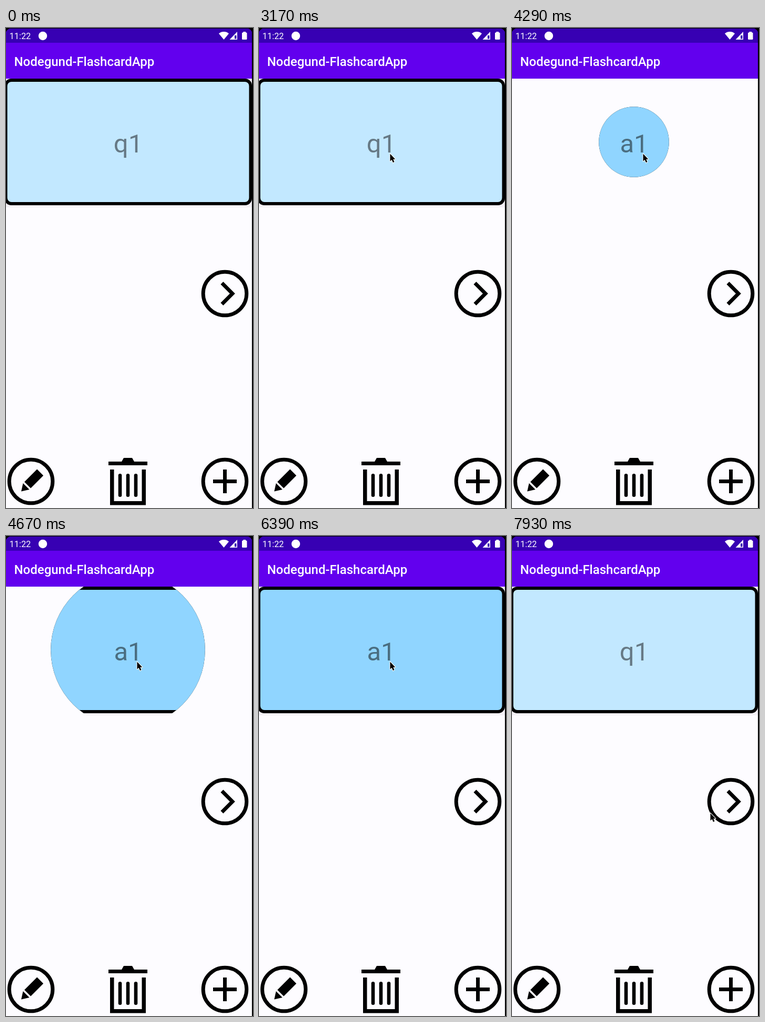
Write an HTML page with a canvas that moves like this. It is 470 px wide and 910 px high and loops after 8000 ms.

```html
<!DOCTYPE html>
<html lang="en">
<head>
<meta charset="utf-8">
<title>Flashcards</title>
<style>
  html, body { margin: 0; width: 100%; height: 100%; overflow: hidden; background: #fdfcff; }
  canvas { display: block; }
</style>
</head>
<body>
<canvas id="stage" width="470" height="910"></canvas>
<script>
const ctx = document.getElementById('stage').getContext('2d');
const LOOP = 8000;
const PAPER = '#fdfcff', SHADE = '#f4f1f6', PURPLE = '#6200ee', DARK = '#3700b3';
const FONT = 'Roboto, "Noto Sans", sans-serif';
const MIDDLE = { x: 232, y: 216 };
const FULL_RADIUS = 262;

// Ticks come in groups of three, lasting 20, 20 and 100 ms.
function tickAt(ms) {
  const k = ms - 3970;
  const group = Math.floor(k / 140);
  const rest = k - group * 140;
  return group * 3 + (rest < 20 ? 0 : rest < 40 ? 1 : 2);
}

const clamp = v => Math.max(0, Math.min(1, v));
const ease = v => 0.5 - Math.cos(Math.PI * clamp(v)) / 2;
const mix = (a, b, v) => a + (b - a) * v;

function rect(x, y, w, h, color = '#000') {
  ctx.fillStyle = color;
  ctx.fillRect(x, y, w, h);
}

function round(x, y, w, h, r, color) {
  ctx.beginPath();
  ctx.roundRect(x, y, w, h, r);
  ctx.fillStyle = color;
  ctx.fill();
}

function circle(x, y, r) {
  ctx.beginPath();
  ctx.arc(x, y, r, 0, Math.PI * 2);
}

function disc(x, y, r, color) {
  circle(x, y, r);
  ctx.fillStyle = color;
  ctx.fill();
}

function triangle(x1, y1, x2, y2, x3, y3, color = '#000') {
  ctx.beginPath();
  ctx.moveTo(x1, y1);
  ctx.lineTo(x2, y2);
  ctx.lineTo(x3, y3);
  ctx.closePath();
  ctx.fillStyle = color;
  ctx.fill();
}

function text(str, x, y, size, weight, color, align = 'left') {
  ctx.font = `${weight} ${size}px ${FONT}`;
  ctx.textAlign = align;
  ctx.fillStyle = color;
  ctx.fillText(str, x, y);
}

// Runs a drawing with its own origin and rotation.
function at(x, y, angle, paint) {
  ctx.save();
  ctx.translate(x, y);
  ctx.rotate(angle);
  paint();
  ctx.restore();
}

function drawHeader() {
  rect(0, 0, 470, 96);
  round(0, 1, 468, 95, [9, 9, 0, 0], PURPLE);
  round(0, 1, 468, 27, [9, 9, 0, 0], DARK);
  text('11:22', 6.5, 21, 16.4, 400, '#fff');
  disc(70, 15, 8.2, '#fff');
  text('Nodegund-FlashcardApp', 15.5, 72, 24, 500, '#fff');

  // Wi-Fi, signal and battery
  ctx.beginPath();
  ctx.moveTo(414.5, 22);
  ctx.arc(414.5, 22, 15, -Math.PI * 0.72, -Math.PI * 0.28);
  ctx.fillStyle = '#fff';
  ctx.fill();
  triangle(425.5, 22, 440, 22, 440, 7, '#fff');
  rect(435, 14, 3.5, 6.5, DARK);
  round(449, 8.5, 9.5, 13.5, 1.5, '#fff');
  rect(451.5, 7, 4.5, 2, '#fff');
}

// A black ring with an icon drawn around its centre.
function button(x, y, icon) {
  at(x, y, 0, () => {
    circle(0, 0, 41.3);
    ctx.lineWidth = 7;
    ctx.strokeStyle = '#000';
    ctx.stroke();
    icon();
  });
}

function chevron() {
  ctx.beginPath();
  ctx.moveTo(-5.6, -20);
  ctx.lineTo(14.4, 0);
  ctx.lineTo(-5.6, 20);
  ctx.stroke();
}

function pencil() {
  at(-18.5, 19, -Math.PI / 4, () => {
    triangle(0, 0, 13.4, -8.5, 13.4, 8.5);
    rect(17, -8.5, 34, 17);
  });
}

function plus() {
  rect(-22.5, -3.5, 45, 7);
  rect(-3.5, -22.5, 7, 45);
}

function drawBin() {
  at(232, 815, 0, () => {
    rect(-37, 7, 74, 7);
    ctx.beginPath();
    ctx.moveTo(-8, 0);
    ctx.lineTo(8, 0);
    ctx.lineTo(12.5, 8);
    ctx.lineTo(-12.5, 8);
    ctx.fill();
    rect(-34, 22, 7.5, 67);
    rect(26.5, 22, 7.5, 67);
    rect(-34, 82, 68, 7.5);
    for (const side of [-1, 0, 1]) round(side * 15 - 3.3, 30, 6.6, 44, 3.3, '#000');
  });
}

function drawButtons() {
  button(416.5, 503.5, chevron);
  button(47.5, 859.5, pencil);
  button(416.5, 859.5, plus);
  drawBin();
}

function drawCard(label, fill, ink) {
  rect(0, 96, 468, 244, SHADE);
  round(-3, 96, 471, 240, 13, '#000');
  round(2.5, 102, 460, 228, 8, fill);
  text(label, 232.5, 236, 49, 400, ink, 'center');
}

const drawQuestion = () => drawCard('q1', '#c2e8ff', '#667985');
const drawAnswer = () => drawCard('a1', '#90d5ff', '#4a6d80');

function drawReveal(p) {
  ctx.save();
  circle(MIDDLE.x, MIDDLE.y, FULL_RADIUS * ease(p));
  ctx.clip();
  drawAnswer();
  ctx.restore();
}

function drawCursor(tick) {
  if (tick < -67) return;
  const enter = ease((tick + 67) / 6);
  const leave = ease((tick - 72) / 12);
  const x = mix(mix(468, 249.5, enter), 377.5, leave);
  const y = mix(mix(340, 238.5, enter), 525.5, leave);
  at(x, y, 0, () => {
    const arrow = new Path2D('M0 0V14L3.2 11.2 5.4 16.6 8 15.6 5.8 10.3H9.8Z');
    ctx.lineWidth = 2;
    ctx.lineJoin = 'round';
    ctx.strokeStyle = '#fff';
    ctx.stroke(arrow);
    ctx.fillStyle = '#000';
    ctx.fill(arrow);
  });
}

function draw(ms) {
  const tick = tickAt(ms);
  const p = (tick + 3.7) * 0.0288;
  rect(0, 0, 470, 910, PAPER);
  drawHeader();
  if (p < 0 || tick >= 62) drawQuestion();
  else if (p < 1) drawReveal(p);
  else drawAnswer();
  drawButtons();
  drawCursor(tick);
  rect(468, 0, 2, 910);
}

const start = performance.now();
function loop() {
  draw((performance.now() - start) % LOOP);
  requestAnimationFrame(loop);
}
loop();
</script>
</body>
</html>
```
